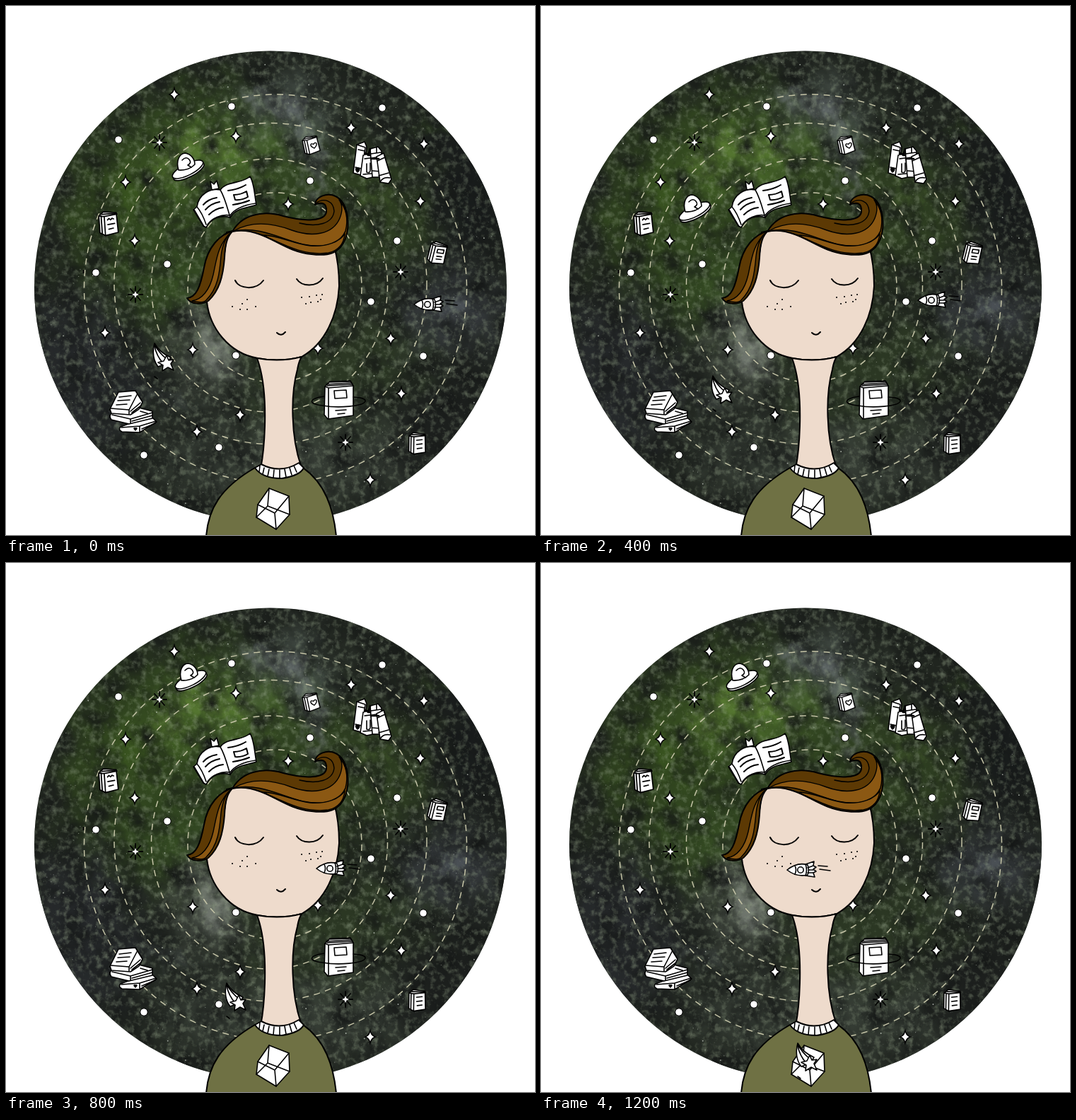
Animation of 748 by 748 pixels, one loop 1400 ms. Source, as an HTML page:

```html
<!DOCTYPE html>
<html lang="en">
<head>
<meta charset="utf-8">
<title>Daydreaming among books</title>
<style>
  html, body { margin: 0; width: 100%; height: 100%; overflow: hidden; background: #fff; }
  svg { position: absolute; inset: 0; width: 100%; height: 100%; will-change: transform; }
  .ink { fill: #fff; stroke: #000; stroke-width: 1.6; stroke-linejoin: round; stroke-linecap: round; }
  .line { fill: none; }
  .solid { fill: #000; }
  .skin { fill: #eedbcc; }
  .dark { fill: #5c3904; }
  .light { fill: #8b5813; }
  .body { stroke-width: 2; }
</style>
</head>
<body>
<!-- still sky, on its own layer so that it is painted once -->
<svg viewBox="0 0 748 748">
  <defs>
    <clipPath id="disc"><circle cx="374" cy="397.500" r="334"/></clipPath>
    <filter id="cloud" x="-30%" y="-30%" width="160%" height="160%" color-interpolation-filters="sRGB">
      <feGaussianBlur stdDeviation="26" result="soft"/>
      <feTurbulence type="fractalNoise" baseFrequency=".025" numOctaves="5" seed="4"/>
      <feDisplacementMap in="soft" scale="80" xChannelSelector="R" yChannelSelector="G"/>
    </filter>
    <filter id="wisp" x="-50%" y="-50%" width="200%" height="200%" color-interpolation-filters="sRGB">
      <feGaussianBlur stdDeviation="9" result="soft"/>
      <feTurbulence type="fractalNoise" baseFrequency=".04" numOctaves="5" seed="9"/>
      <feDisplacementMap in="soft" scale="60" xChannelSelector="R" yChannelSelector="G"/>
    </filter>
    <filter id="dust" x="0" y="0" width="100%" height="100%" color-interpolation-filters="sRGB">
      <feTurbulence type="fractalNoise" baseFrequency=".026" numOctaves="6" seed="12"/>
      <feColorMatrix values="0 0 0 0 .08  0 0 0 0 .09  0 0 0 0 .085  1.9 0 0 0 -.75"/>
    </filter>
    <filter id="grain" x="0" y="0" width="100%" height="100%" color-interpolation-filters="sRGB">
      <feTurbulence type="fractalNoise" baseFrequency=".11" numOctaves="4" seed="3"/>
      <feColorMatrix values="0 0 0 0 .6  0 0 0 0 .66  0 0 0 0 .55  1.1 0 0 0 -.52"/>
    </filter>
  </defs>
  <g clip-path="url(#disc)">
    <rect width="748" height="748" fill="#20251f"/>
    <g filter="url(#cloud)">
      <ellipse cx="295" cy="290" rx="215" ry="180" fill="#2d3f1e"/>
      <ellipse cx="505" cy="300" rx="95" ry="85" fill="#2e3e21"/>
      <ellipse cx="470" cy="520" rx="150" ry="80" fill="#2b3723"/>
      <ellipse cx="410" cy="640" rx="200" ry="65" fill="#353c34"/>
      <ellipse cx="105" cy="530" rx="85" ry="120" fill="#26292b"/>
      <ellipse cx="630" cy="430" rx="75" ry="55" fill="#34383b"/>
      <ellipse cx="660" cy="240" rx="60" ry="120" fill="#181b1b"/>
      <ellipse cx="640" cy="590" rx="100" ry="90" fill="#1c1f1d"/>
      <ellipse cx="295" cy="212" rx="85" ry="50" fill="#49682a"/>
      <ellipse cx="190" cy="270" rx="60" ry="50" fill="#39541f"/>
      <ellipse cx="240" cy="400" rx="70" ry="40" fill="#344b22"/>
      <ellipse cx="400" cy="150" rx="60" ry="45" fill="#464f49"/>
      <ellipse cx="290" cy="480" rx="45" ry="65" fill="#51584f"/>
    </g>
    <g filter="url(#wisp)" opacity=".6">
      <path fill="none" stroke="#858b92" stroke-width="20" d="M340 130Q410 120 430 195T440 255"/>
      <path fill="none" stroke="#969c94" stroke-width="22" d="M268 428Q283 495 325 525"/>
      <path fill="none" stroke="#66893a" stroke-width="22" d="M215 235Q285 175 350 205"/>
      <ellipse cx="520" cy="270" rx="20" ry="20" fill="#4b6530"/>
      <ellipse cx="635" cy="425" rx="24" ry="14" fill="#626970"/>
      <ellipse cx="225" cy="560" rx="35" ry="10" fill="#4a5150"/>
      <ellipse cx="595" cy="175" rx="24" ry="8" fill="#3c5526"/>
    </g>
    <rect width="748" height="748" filter="url(#dust)"/>
    <rect width="748" height="748" filter="url(#grain)"/>
    <g id="specks" fill="none" stroke="#dfe5dc" stroke-linecap="round"></g>
    <g fill="none" stroke="#c4c3a6" stroke-width="1.500" stroke-dasharray="9 7.500">
      <ellipse cx="381" cy="400" rx="270.500" ry="275"/>
      <ellipse cx="374" cy="392.500" rx="221" ry="227"/>
      <ellipse cx="372.500" cy="395" rx="167" ry="179"/>
      <ellipse cx="380" cy="398" rx="123" ry="134"/>
    </g>
  </g>
</svg>

<svg viewBox="0 0 748 748">
  <defs>
    <g id="spark">
      <path class="solid" d="M0-12Q1.500-2 9 0Q1.500 2 0 12Q-1.500 2-9 0Q-1.500-2 0-12"/>
      <path fill="#fff" d="M0-6.500Q1.500-1.500 5.500 0Q1.500 1.500 0 6.500Q-1.500 1.500-5.500 0Q-1.500-1.500 0-6.500"/>
    </g>
    <g id="burst">
      <path stroke="#000" stroke-width="1.800" stroke-linecap="round" d="M0-11V11M-10 0H10M-7-8L7 8M-7 8L7-8"/>
      <path fill="#fff" d="M0-5L1.500-1.500L5 0L1.500 1.500L0 5L-1.500 1.500L-5 0L-1.500-1.500"/>
    </g>
    <circle id="dot" r="5.200" fill="#fff" stroke="#000"/>
    <g id="book">
      <path d="M-12-11L-6-16L11-14L12 12L-5 15L-12 11Z"/>
      <path class="line" d="M-12-11L-5-10L12-12M-5-10V15M-9-11V13M-8-13L11-13"/>
    </g>
    <path id="text" class="line" d="M-1-5L7-6M-1 1L7 0M0 7L7 6"/>
  </defs>

  <g id="stars"><path stroke="#000" stroke-width="2" d="M109.500 373v5"/></g>

  <g class="ink">
    <g transform="translate(145 308) rotate(-4) scale(1.080)"><use href="#book"/><path class="line" d="M-1-5l2-2l2 2l2-2l2 1M-1 1L8 0M0 7L6 6"/></g>
    <g transform="translate(610 350) rotate(14)"><use href="#book"/><path class="line" d="M-1-6L8-7V-2L-1-1ZM0 4L7 3M0 8L7 7"/></g>
    <g transform="translate(581.500 619) rotate(1) scale(.98)"><use href="#book"/><use href="#text"/></g>
    <g transform="translate(431.500 197) rotate(-12) scale(.9 .82)"><use href="#book"/><path class="line" d="M4 6C-3 1-1-5 4-1C8-6 12 0 4 6"/></g>

    <!-- open book -->
    <path d="M265 288L270 284C272 267 288 257 303 260C312 247 333 252 345 241C351 250 351 266 354 281C341 286 325 285 317 299C304 295 290 300 283 313L279 311Z"/>
    <path class="line" d="M270 284C277 292 280 300 283 309M303 260C310 272 313 286 317 299M266 288L280 312M285 309C291 300 304 294 317 296Q326 283 353 279"/>
    <path class="line" stroke-width="2" d="M279 281Q286 273 298 271M282 288Q290 279 302 277M287 295Q296 286 307 285M314 261Q327 260 339 253M322 267Q332 267 340 262L342 270Q333 275 324 274ZM321 281Q334 279 344 275"/>
    <path d="M291 260L289 248L294 252L298 247L301 258Z"/>

    <!-- leaning books -->
    <path d="M496 196L507 192L510 199L505 240L491 236Z"/>
    <path class="line" d="M496 196L508 200L503 239M498 203L507 205M494 228L503 230"/>
    <path class="solid" d="M497 235C493 231 495 228 497 230C499 228 502 231 497 235"/>
    <path d="M505 211L515 208L519 242L510 244L501 240Z"/>
    <path class="line" d="M507 216L515 215M510 223v12q5 2 5-3v-10M505 238L517 237"/>
    <path d="M515 202L526 199L531 205L530 242L518 242Z"/>
    <path class="line" d="M516 209L530 207M517 215L530 213M518 233L530 234M524 200V207"/>
    <path d="M524 213L534 208L545 245L541 251L529 249Z"/>
    <path class="line" d="M525 219L536 214M527 240L541 236M529 249Q533 241 543 243"/>
    <path stroke-width="2.600" class="line" d="M507 208L514 211M515 202L512 211M516 216L527 216"/>

    <!-- stack -->
    <path d="M162 595L189 585L207 582L213 588L189 603L164 602Q158 599 162 595"/>
    <path class="line" d="M163 596L189 594L212 587M189 594V603M192 598L211 590"/>
    <path class="solid" d="M183 600q-4-4 0-3q4-1 0 3"/>
    <path d="M149 576L184 567L207 573L207 583L174 591L149 585Q145 580 149 576"/>
    <path class="line" d="M150 578L176 584L207 575M176 584V590M178 587L207 579M190 573L200 576"/>
    <path d="M147 570L159 546L183 544L193 560L188 570L176 578L149 576Z"/>
    <path class="line" d="M148 569L174 571L186 548M174 571V577M176 573L190 561M178 575L191 565M160 553L177 551M158 558L175 557M156 564L171 563"/>

    <!-- ringed book -->
    <path d="M451 538L458 531L487 530L491 537L491 579L455 584L450 578Z"/>
    <path class="line" d="M451 538L456 540L491 537M456 540V583M453 535L488 533M454 537L490 535M458 532L487 531"/>
    <path class="line" d="M464 544L481 543L482 554L465 555ZM466 572L481 571M469 577L479 576"/>
    <path class="line" d="M450 552C428 555 426 563 448 565C470 569 505 566 508 559Q509 554 491 553"/>
  </g>

  <g class="ink body">
    <path class="skin" d="M312 320C309 370 300 395 284 418C288 455 315 491 356 498Q388 504 418 496C452 477 469 437 471 396Q471 365 464 340L400 300Z"/>
    <path class="skin" d="M355 498C365 525 367 560 366 594Q365 630 360 654Q390 665 417 650C403 610 402 550 412 514Q414 502 418 496Q388 504 355 498"/>
    <path fill="#6f7144" d="M283 750C286 712 302 682 352 653Q388 680 420 653C451 675 463 710 467 750Z"/>
    <path d="M352 653L361 648Q388 662 414 646L421 653Q416 664 390 668Q362 668 352 653Z"/>
    <path class="line" stroke-width="1.600" d="M359 650l-1 9M365 653l-2 9M372 655l-2 10M379 656l-1 11M387 656v11M394 655l2 11M401 653l3 10M407 650l4 9"/>

    <path class="dark" d="M321 318C302 323 285 341 280 370C275 397 269 412 256 413C261 422 276 423 286 417C302 402 307 382 309 356C310 334 314 324 321 318"/>
    <path class="light" d="M319 319C299 338 298 358 293 380C288 402 277 415 263 417Q278 421 283 416C300 399 302 377 304 354C306 336 311 326 319 319" stroke-width="1.400"/>
    <path class="dark" d="M320 319C333 296 361 288 392 297C422 305 451 305 453 291C454 279 447 276 437 281C437 270 454 263 466 269C484 278 487 310 480 329C472 350 456 354 432 351C401 348 382 331 359 323Q338 315 320 319"/>
    <g stroke-width="1.400">
      <path class="light" d="M322 318C350 302 380 308 404 317C432 327 462 324 472 300C476 290 476 281 471 274C481 286 484 302 480 318C470 340 446 342 420 337C388 329 358 311 322 318"/>
      <path class="light" d="M363 324C385 324 405 336 430 339C454 341 472 333 479 322Q477 344 456 349C420 354 390 336 363 324"/>
      <path class="line" d="M438 279C450 270 463 276 464 290C462 308 440 313 415 307"/>
    </g>
    <path class="line" d="M324 388C330 401 354 402 364 388M411 386C418 397 439 398 448 385M383 462Q389 468 395 461"/>
    <path class="line" d="M341 415h.1M320 425h.1M331 429h.1M334 421h.1M341 429h.1M353 425h.1M418 412h.1M424 421h.1M429 411h.1M431 419h.1M439 409h.1M441 418h.1M447 408h.1M445 415h.1"/>
  </g>

  <g class="ink">
    <path d="M372 682L400 693L401 719L382 740L354 723L356 705Z"/>
    <path class="line" d="M372 682L370 707L354 723M370 707L401 719M356 705L380 717L400 693M380 717L382 740"/>
  </g>

  <g id="ufo" class="ink">
    <g transform="translate(0 4) rotate(-27)"><ellipse cy="3" rx="24" ry="8"/><ellipse rx="24" ry="8"/></g>
    <path d="M-13 5C-17-8-12-18-4-19C5-18 10-10 10-3Q1 6-13 5"/>
    <path class="line" d="M-8-9Q-2-15 2-10T0-2L5 1"/>
  </g>
  <g id="comet" class="ink">
    <path d="M-16-26C-19-14-18-2-11 7L2 2L7-6Q-9-13-16-26"/>
    <path class="line" d="M-16-24Q-9-12 1-4M-16-22Q-13-8-4 2M-16 21l4 3"/>
    <path d="M1-9L4-2L11-3L7 3L11 12L3 8L-5 13L-4 5L-11 1L-3-1Z"/>
  </g>
  <g id="rocket" class="ink">
    <path d="M26-8L38-12L37-6L41-4L37-1L41 2L37 4L39 10L26 8Z"/>
    <path d="M0 0C10-8 20-10 29-7Q32 0 29 7C20 9 10 8 0 0"/>
    <path class="line" d="M11-6Q14 0 11 6M26-8Q29 0 26 8M29-3L37-6M30 0H37M29 4H37M44-6L57-5M46-1L61 1"/>
    <circle cx="19" r="4.200"/>
  </g>
</svg>
<script>
  const $ = id => document.getElementById(id);
  const NS = 'http://www.w3.org/2000/svg';
  const add = (parent, tag, attrs) => {
    const el = parent.appendChild(document.createElementNS(NS, tag));
    for (const k in attrs) el.setAttribute(k, attrs[k]);
  };

  let seed = 7;
  const random = () => (seed = seed * 16807 % 2147483647) / 2147483647;
  for (const [count, width, opacity] of [[1200, .8, .25], [260, 1.2, .45], [60, 1.8, .65]]) {
    let d = '';
    for (let i = 0; i < count; i++)
      d += `M${(40 + random() * 668).toFixed(1)} ${(63 + random() * 668).toFixed(1)}h.1`;
    add($('specks'), 'path', { d, 'stroke-width': width, opacity });
  }

  const sky = {
    spark: '238,125 325,184 488,172 591,195 586,276 169,249 182,332 399,280 140,462 264,486 331,578 270,602 544,470 559,548 441,484 515,670',
    burst: '217,193 183,408 558,376 480,617',
    dot: '319,142 532,144 159,189 430,247 127,377 228,365 553,332 516,418 590,495 325,494 195,635 301,624'
  };
  for (const kind in sky)
    for (const at of sky[kind].split(' '))
      add($('stars'), 'use', { href: '#' + kind, transform: `translate(${at})` });

  const STEP = 200;
  const paths = {
    ufo: ['257,227', '233,258', '217,286', '181,211', '261,161', '356,176', '284,161'],
    comet: ['226,503', '240,533', '259,549', '293,571', '328,620', '357,648', '379,705'],
    rocket: ['577,422', '551,415', '533,416', '490,415', '439,432', '401,433', '348,434']
  };
  const glow = [1, .48, 1, .3, 1, .48, 1];

  // The pose holds for each step, then jumps.
  let shown = -1;
  function draw() {
    const i = Math.floor(performance.now() / STEP) % glow.length;
    if (i !== shown) {
      for (const id in paths) $(id).setAttribute('transform', `translate(${paths[id][i]})`);
      $('stars').setAttribute('opacity', glow[i]);
      shown = i;
    }
    requestAnimationFrame(draw);
  }
  draw();
</script>
</body>
</html>
```
